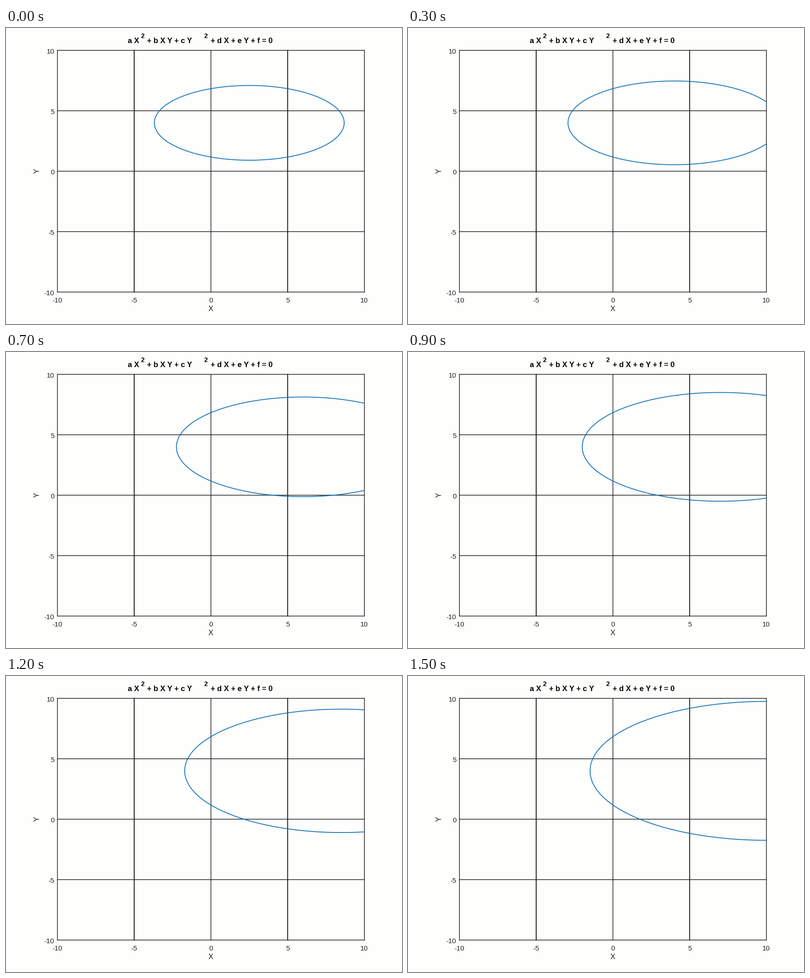
A matplotlib script that plays this animation: 865x647 px, repeating every 1600 ms.

```python
import numpy as np
import matplotlib.pyplot as plt
from matplotlib.animation import FuncAnimation
from matplotlib.patches import Rectangle

W, H, DPI = 865, 647, 100
FRAMES, INTERVAL = 16, 100
PT = 72 / DPI  # points per pixel
X0, Y0 = 447.6, 313.0  # plot origin on the stage
SX, SY = 33.52, 26.42  # pixels per unit
INK, BLUE = "#202020", "#086db4"

plt.rcParams["font.family"] = "Liberation Sans"
plt.rcParams["axes.unicode_minus"] = False

fig = plt.figure(figsize=(W / DPI, H / DPI), dpi=DPI, facecolor="#fefefd")
ax = fig.add_axes([0, 0, 1, 1])
ax.set(xlim=(0, W), ylim=(H, 0))
ax.axis("off")


def px(x):
    return X0 + SX * x


def py(y):
    return Y0 - SY * y


def label(x, y, text, size, **kw):
    kw = {"ha": "center", "va": "baseline", "color": INK, **kw}
    ax.text(x, y, text, fontsize=size * PT, **kw)


def rule(xs, ys, width):
    ax.plot(xs, ys, color=INK, lw=width * PT, snap=False,
            solid_capstyle="projecting", zorder=2)


# Grid and tick labels
for v in range(-10, 11, 5):
    rule([px(v)] * 2, [py(-10), py(10)], 2 if abs(v) == 5 else 1.5)
    rule([px(-10), px(10)], [py(v)] * 2, 1.5)
    label(px(v), 599.5, str(v), 15)
    label(105.5, py(v) + 7, str(v), 15, ha="right")

label(X0, 619, "X", 16.5)
label(73, Y0, "Y", 16.5, rotation=90, rotation_mode="anchor")

# Title pieces with raised exponents
for x, y, text, size in [
    (266.5, 33, "a X", 16.5),
    (294.8, 22.5, "2", 14),
    (308.5, 33, "+ b X Y + c Y", 16.5),
    (432.8, 22.5, "2", 14),
    (447.2, 33, "+ d X + e Y + f = 0", 16.5),
]:
    label(x, y, text, size, ha="left", weight="bold", color="black")

curve, = ax.plot([], [], color=BLUE, lw=1.7 * PT, zorder=3)
box = Rectangle((px(-10), py(10)), 20 * SX + 0.5, 20 * SY,
                transform=ax.transData)
curve.set_clip_path(box)
angle = np.linspace(0, 2 * np.pi, 400)


def draw(i):
    # x^2 + 4(y - 4)^2 - 2cx = 32, with the centre c sliding right
    c = 2.5 + 0.5 * i
    r = np.sqrt(c * c + 32)
    curve.set_data(px(c + r * np.cos(angle)), py(4 + r / 2 * np.sin(angle)))
    return curve,


anim = FuncAnimation(fig, draw, frames=FRAMES, interval=INTERVAL,
                     repeat=True, repeat_delay=0)
plt.show()
```
